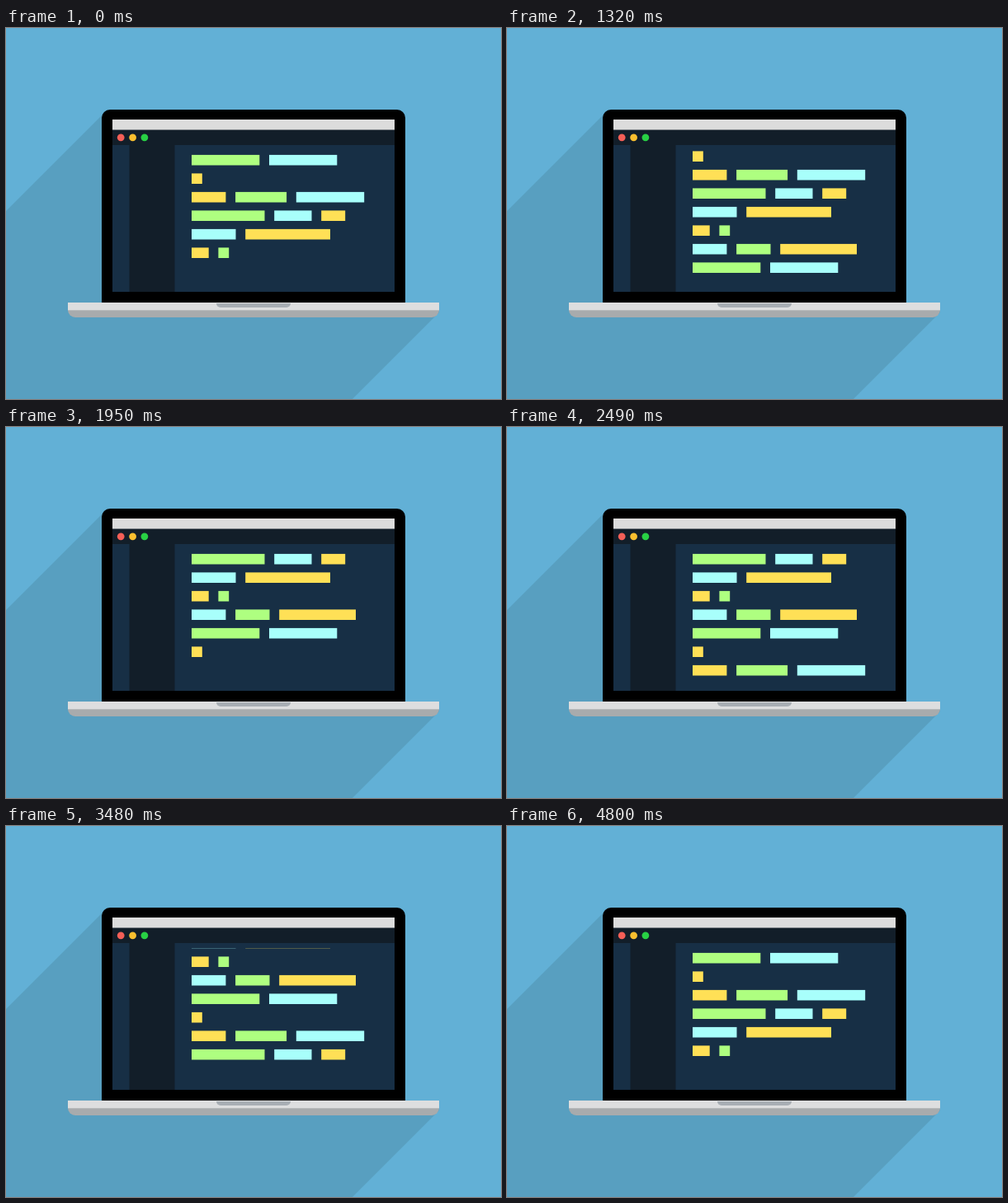
These frames come from a looping animation (600 by 450 pixels, 4.83 s). An HTML page:

```html
<!DOCTYPE html>
<html lang="en">
<head>
<meta charset="utf-8">
<title>Typing laptop</title>
<style>
  html, body { margin: 0; width: 100%; height: 100%; overflow: hidden; background: #62b0d6; }
  svg { display: block; width: 600px; height: 450px; }
</style>
</head>
<body>
<svg viewBox="0 0 600 450">
  <clipPath id="editor"><rect x="205" y="148.5" width="266" height="171"/></clipPath>
  <rect width="600" height="450" fill="#62b0d6"/>
  <path d="M120 102L0 222V450H420L525 345V333H300Z" fill="#589fc0"/>

  <path d="M116 333V109a10 10 0 0 1 10-10H474a10 10 0 0 1 10 10V333Z"/>
  <rect x="129" y="111" width="342" height="209" fill="#172f45"/>
  <rect x="129" y="123" width="342" height="19" fill="#121e29"/>
  <rect x="149.5" y="142" width="55" height="178" fill="#121e29"/>
  <rect x="129" y="111" width="342" height="12.5" fill="#dcdcdc"/>
  <circle cx="139.2" cy="132.8" r="4.4" fill="#f45f57"/>
  <circle cx="153.6" cy="132.8" r="4.4" fill="#f9bf2f"/>
  <circle cx="167.9" cy="132.8" r="4.4" fill="#28d044"/>

  <path d="M75 342H525a9 9 0 0 1-9 9H84a9 9 0 0 1-9-9Z" fill="#a8abad"/>
  <rect x="75" y="333" width="450" height="9.3" fill="#dddedf"/>
  <path d="M255 334H345a5 5 0 0 1-5 5H260a5 5 0 0 1-5-5Z" fill="#a8aeb4"/>

  <g id="code" clip-path="url(#editor)"></g>
</svg>
<script>
const TICK = 30, TICKS = 161;
const LEFT = 225, TOP = 153.9, PITCH = 22.5, HEIGHT = 12.6, SPACE = 11.7, LAST_ROW = 6;
const SCROLL = 5, PAUSE = 3, LONG_PAUSE = 7, CARET = 2;
const COLORS = { g: '#aeff80', c: '#a8fffb', y: '#ffe056' };

const lines = [
  'c41.4 g41.4 y92.8',
  'g82.3 c82.3',
  'y12.8',
  'y41.4 g62 c82.4',
  'g88.5 c45.3 y29',
  'c53.5 y102.8',
  'y20.7 g12.8',
];

const code = document.getElementById('code');
const clamp = v => Math.min(1, Math.max(0, v));

function addRect(attrs) {
  const rect = document.createElementNS('http://www.w3.org/2000/svg', 'rect');
  for (const key in attrs) rect.setAttribute(key, attrs[key]);
  return code.appendChild(rect);
}

// Lay out the bars and schedule typing and scrolling, in ticks
let clock = 1;
const rows = lines.map(line => {
  const start = clock;
  let x = LEFT;
  const bars = line.split(' ').map(spec => {
    const width = +spec.slice(1);
    const bar = { width, start: clock, duration: width > 70 ? 5 : 2 };
    bar.rect = addRect({ x, height: HEIGHT, fill: COLORS[spec[0]] });
    x += width + SPACE;
    clock += bar.duration + PAUSE;
    return bar;
  });
  if (x < LEFT + 60) clock += LONG_PAUSE - PAUSE;
  const scroll = clock;
  clock += SCROLL + PAUSE;
  return { start, scroll, bars };
});

function draw(now) {
  const tick = Math.floor(now / TICK + 1e-6) % TICKS;
  const scrolled = rows.reduce((sum, row) => sum + clamp((tick - row.scroll) / SCROLL), 0);

  rows.forEach((row, i) => {
    // Until a line is typed again, it is still on show from the previous loop
    const fresh = tick >= row.start;
    const y = TOP + PITCH * (i - scrolled + (fresh ? LAST_ROW : -1));
    for (const { rect, width, start, duration } of row.bars) {
      const typed = CARET + (width - CARET) * clamp((tick - start) / duration);
      rect.setAttribute('y', y);
      rect.setAttribute('width', !fresh ? width : tick < start ? 0 : typed);
    }
  });
}

let begin;
function loop(now) {
  begin ??= now;
  draw(now - begin);
  requestAnimationFrame(loop);
}
draw(0);
requestAnimationFrame(loop);
</script>
</body>
</html>
```
